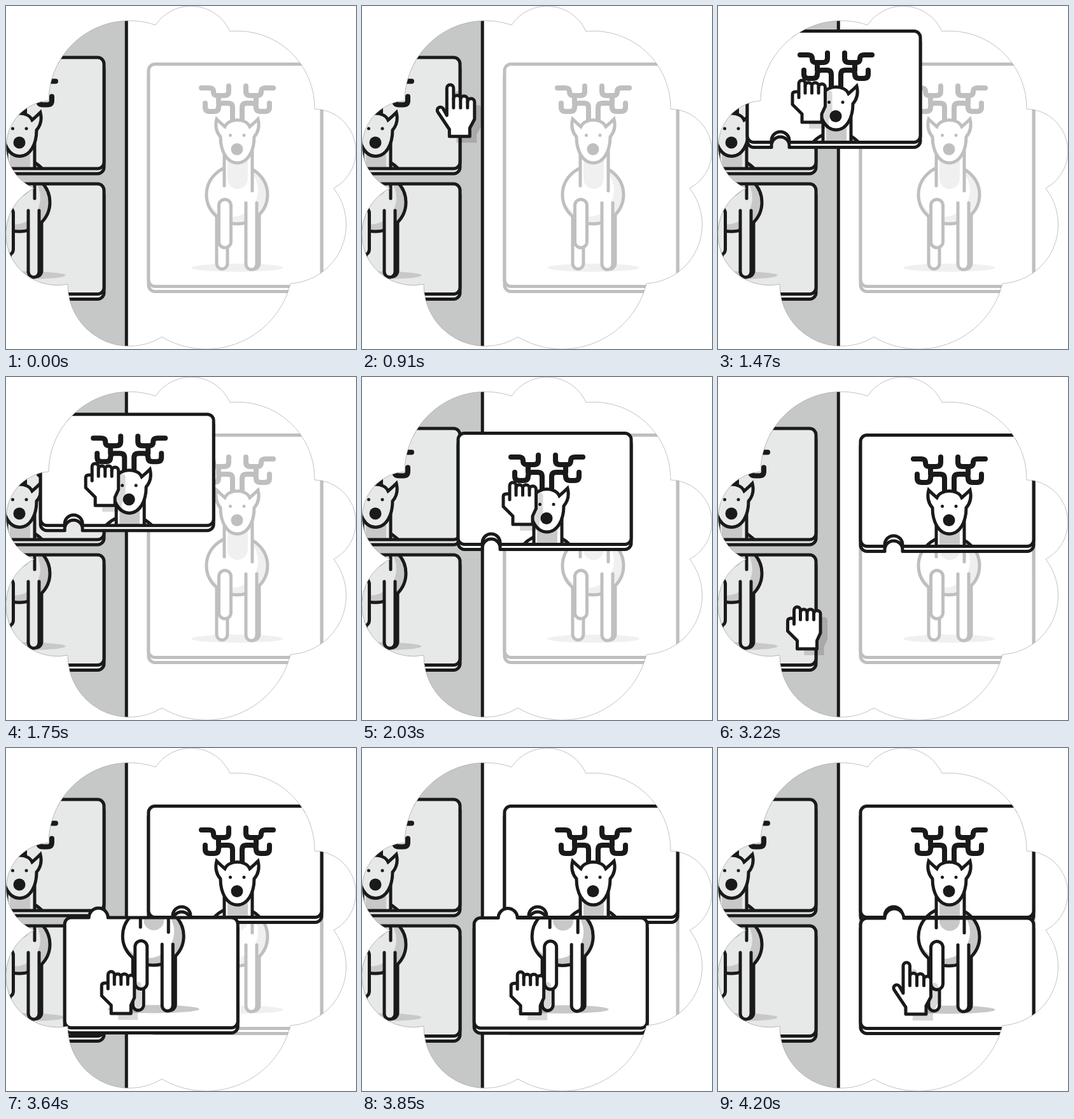
These frames come from a looping animation (550x540 px, 4.9 s). An HTML page:

```html
<!DOCTYPE html>
<html lang="en">
<head>
<meta charset="utf-8">
<title>Reindeer puzzle</title>
<style>
  html, body { margin: 0; height: 100%; overflow: hidden; background: #fff; }
  svg { display: block; width: 100vw; height: 100vh; color: #fff; }
  .ink { stroke: #1a1a1a; stroke-width: 5; stroke-linecap: round; stroke-linejoin: round; }
  .sharp { stroke-linejoin: miter; }
  .paper { fill: currentColor; }
  .line { fill: none; }
  .dark { fill: #1a1a1a; }
  .shade { fill: #c8c8c8; }
  .tray { color: #e7e8e8; }
</style>
</head>
<body>
<svg viewBox="0 0 550 540">
  <defs>
    <path id="cloud" d="M235 30A67 67 0 0 1 352 40A121 121 0 0 1 485 162A66.500 66.500 0 0 1 515 287A93 93 0 0 1 447 437A136.500 136.500 0 0 1 245 521A97 97 0 0 1 97 438A80.700 80.700 0 0 1 44 287A72 72 0 0 1 67 149A127 127 0 0 1 235 30Z"/>
    <clipPath id="cloudClip"><use href="#cloud"/></clipPath>
    <clipPath id="topHalf"><path d="M220 90H500V266H220Z"/></clipPath>
    <clipPath id="lowHalf"><path d="M220 268H500V441H220Z"/></clipPath>

    <path id="topEdge" d="M234 91.500H486a10 10 0 0 1 10 10V256.500a10 10 0 0 1-10 10H290v-2.500a14 14 0 0 0-28 0v2.500H234a10 10 0 0 1-10-10V101.500a10 10 0 0 1 10-10Z"/>
    <path id="lowEdge" d="M234 268H262a15 15 0 0 1 30 0H486a10 10 0 0 1 10 10V431.500a10 10 0 0 1-10 10H234a10 10 0 0 1-10-10V278a10 10 0 0 1 10-10Z"/>

    <path id="antler" class="ink line" style="stroke-width:8" d="M307 129H319q7 0 7 6t7 6H343q7 0 7-7V126M334 141V153M313 153V159q0 7 7 7h7q7 0 7-7q0-6 6-6H349q7 0 7 7V180"/>

    <g id="deer">
      <ellipse class="shade" cx="363.500" cy="412" rx="72" ry="6.500"/>
      <path class="ink dark" d="M380 320V405a9 9 0 0 0 18 0V320Z"/>
      <path class="ink paper" d="M331 325V405a8.500 9 0 0 0 17 0V325Z"/>
      <ellipse class="shade" cx="363" cy="297" rx="48" ry="46"/>
      <ellipse class="paper" cx="355" cy="290" rx="41" ry="42"/>
      <ellipse class="ink line" cx="363" cy="297" rx="48" ry="46"/>
      <path class="paper" d="M343 230H387V282H343Z"/>
      <path class="shade" d="M348 230V272a16 16 0 0 0 32 0V230Z"/>
      <path class="ink line" d="M343 225V283M387 225V291"/>
      <path class="ink paper" d="M377 310V406a8.500 9 0 0 0 17 0V310"/>
      <rect class="ink paper" x="334.500" y="304.500" width="19" height="76" rx="9.500"/>
      <use href="#antler"/>
      <use href="#antler" transform="matrix(-1 0 0 1 727 0)"/>
      <path class="ink paper sharp" d="M331 178Q337 184 344 190C350 176 377 176 383 190Q390 184 396 178C399 190 396 199 390 206C390 228 380 247 363.500 247C347 247 337 228 337 206C331 199 328 190 331 178Z"/>
      <circle class="dark" cx="352.500" cy="203.500" r="2.500"/>
      <circle class="dark" cx="374" cy="203.500" r="2.500"/>
      <circle class="dark" cx="363" cy="225.500" r="9.500"/>
    </g>

    <g id="topCard">
      <use href="#topEdge" class="ink paper" y="8"/>
      <use href="#topEdge" class="paper"/>
      <use href="#deer" clip-path="url(#topHalf)"/>
      <use href="#topEdge" class="ink line"/>
    </g>
    <g id="lowCard">
      <use href="#lowEdge" class="ink paper" y="8"/>
      <use href="#lowEdge" class="paper"/>
      <use href="#deer" clip-path="url(#lowHalf)"/>
      <use href="#lowEdge" class="ink line"/>
    </g>

    <path id="openHand" d="M291 386V343a5.250 5.250 0 0 1 10.500 0V360a5.500 5.500 0 0 1 11 0V361a5.500 5.500 0 0 1 11 0V365a5.500 5.500 0 0 1 11 0V392L327 406V419H295V408L277 381C273 375 281 370 285 375Z"/>
    <path id="fistHand" d="M292 380V358a5 5 0 0 1 10 0V362a5.250 5.250 0 0 1 10.500 0a5.250 5.250 0 0 1 10.500 0V364a5.250 5.250 0 0 1 10.500 0V394L328 406V419H297V406L282 391V375q0-4 5-4h5"/>
  </defs>

  <g clip-path="url(#cloudClip)">
    <path fill="#c6c7c7" d="M0 0H189V540H0Z"/>
    <path class="ink" d="M189.250 0V540"/>
    <use class="tray" href="#topCard" x="-342" y="-10.500"/>
    <use class="tray" href="#lowCard" x="-342" y="12"/>

    <g opacity=".28">
      <rect class="ink paper" x="224" y="99.500" width="272" height="350" rx="10"/>
      <rect class="ink paper" x="224" y="91.500" width="272" height="350" rx="10"/>
      <use href="#deer"/>
    </g>

    <use id="top" href="#topCard"/>
    <use id="low" href="#lowCard"/>

    <g id="hand">
      <g id="open">
        <use href="#openHand" x="11" y="10" opacity=".15"/>
        <use href="#openHand" class="ink paper"/>
        <path class="ink line" d="M301.500 360V374M312.500 361V374M323.500 365V374"/>
      </g>
      <g id="fist">
        <use href="#fistHand" x="11" y="10" opacity=".15"/>
        <use href="#fistHand" class="ink paper"/>
        <path class="ink line" d="M302 362V373M312.500 362V373M323 364V373"/>
      </g>
    </g>
  </g>
  <use href="#cloud" fill="none" stroke="#999" stroke-width=".6"/>
</svg>
<script>
const LOOP = 4900, STEP = 70;
const el = id => document.getElementById(id);
const upper = el('top'), lower = el('low'), hand = el('hand'), open_ = el('open'), fist = el('fist');

const show = (node, on) => { node.style.display = on ? '' : 'none'; };
const move = (node, x, y) => node.setAttribute('transform', `translate(${x} ${y})`);

function draw(t) {
  // sine ease from 0 to 1 between times a and b
  const ease = (a, b) => (1 - Math.cos(Math.PI * Math.min(1, Math.max(0, (t - a) / (b - a))))) / 2;

  // card offsets from their final places
  const topX = -178 * (1 - ease(1658, 2325));
  const topY = -27 - 25 * ease(1120, 1470) + 52 * ease(1480, 2130);
  const lowX = -169 * (1 - ease(3443, 4076));
  const lowY = 10 - 11 * ease(3290, 3640) + ease(3640, 4076);
  move(upper, topX, topY);
  move(lower, lowX, lowY);
  show(upper, t >= 1120);
  show(lower, t >= 3290);

  // the hand flies in, carries one card, travels down, carries the other
  const away = 1 - ease(420, 920), settle = 1 - ease(940, 1120), close = ease(3080, 3290);
  const x = topX + 13 + 340 * away + 7 * settle - 196 * ease(2340, 3050) + 14 * close + lowX + 169;
  const y = topY - 184 + 243 * away - 3 * settle + 190 * ease(2280, 3000) + 4 * close + lowY - 10;
  const grip = t >= 1050 && t < 2380 || t >= 3220 && t < 4130;
  move(hand, x, y);
  show(hand, t >= 490);
  show(open_, !grip);
  show(fist, grip);
}

function tick() {
  draw(Math.floor(performance.now() % LOOP / STEP) * STEP);
  requestAnimationFrame(tick);
}
tick();
</script>
</body>
</html>
```
